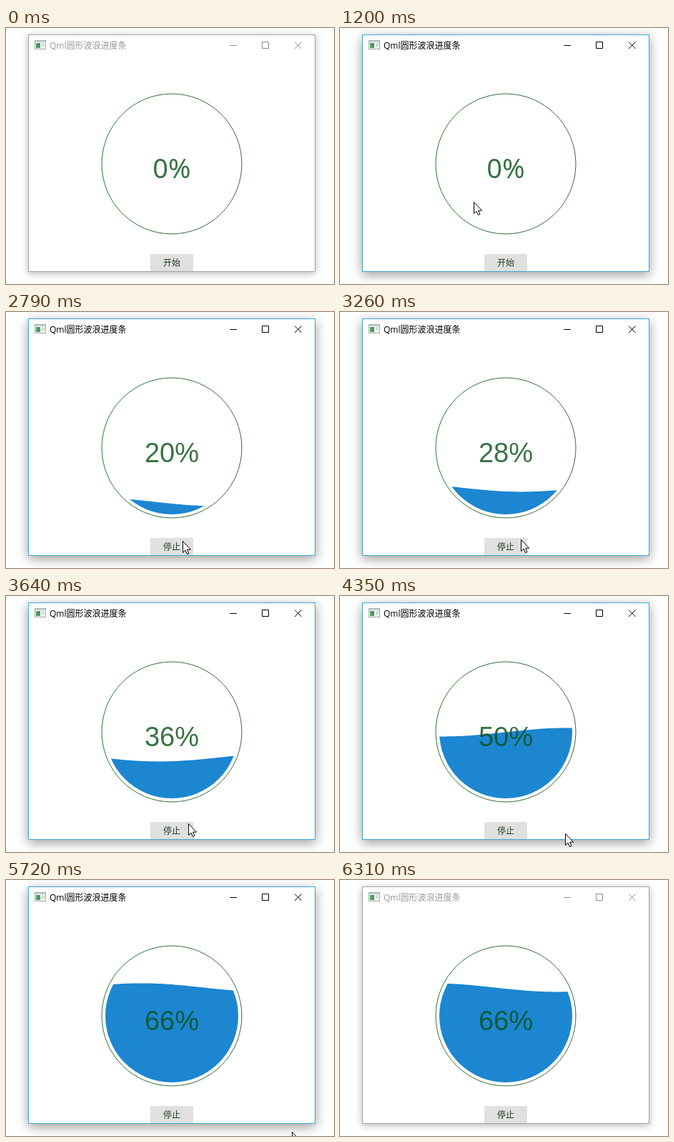
Recreate the animation shown at these times as an HTML page. Size 459 by 358 pixels, loop 6.36 s.

```html
<!DOCTYPE html>
<html lang="zh">
<head>
<meta charset="utf-8">
<title>Wave progress</title>
<style>
  html, body { margin: 0; width: 100%; height: 100%; overflow: hidden; background: #fff; }
  #stage { position: relative; width: 459px; height: 358px; overflow: hidden; }
  #win {
    position: absolute; left: 31px; top: 9px; width: 400px; height: 330px;
    border: 1px solid #a3a8a3; background: #fff;
    box-shadow: 0 2px 10px rgba(0, 0, 0, .3);
  }
  svg { position: absolute; left: 0; top: 0; }
  text { font-family: "Open Sans", "Noto Sans CJK SC", "Noto Sans CJK", sans-serif; font-size: 12px; }
  #title { fill: #999; }
  #controls { stroke: #8c8c8c; fill: none; }
  .active #win { border-color: #42a5de; box-shadow: 0 4px 15px rgba(0, 0, 0, .4); }
  .active #title { fill: #000; }
  .active #controls { stroke: #000; }
  #label { fill: #1d3a22; text-anchor: middle; }
  #percent {
    font-family: "Liberation Sans", Arial, sans-serif; font-size: 38px;
    fill: rgba(6, 80, 20, .8); text-anchor: middle;
  }
  #percent.single { font-family: "Noto Sans", "Open Sans", sans-serif; }
</style>
</head>
<body>
<div id="stage">
  <div id="win"></div>
  <svg width="459" height="358" viewBox="0 0 459 358">
    <defs>
      <clipPath id="bowl"><circle cx="232" cy="190" r="93"/></clipPath>
      <linearGradient id="rim">
        <stop offset="0" stop-color="#1f7a26"/>
        <stop offset="1" stop-color="#3c6347"/>
      </linearGradient>
    </defs>

    <g shape-rendering="crispEdges">
      <rect x="40.5" y="17.5" width="15" height="12" fill="#f4f4f4" stroke="#a4aaa8"/>
      <rect x="41" y="18" width="14" height="2" fill="#c9d0d2"/>
      <rect x="42" y="21" width="6" height="7" fill="#4f9a68"/>
      <rect x="50" y="21" width="4" height="5" fill="#d5dadc"/>
    </g>
    <text id="title" x="61" y="29">Qml圆形波浪进度条</text>
    <g id="controls">
      <path d="M313 24.5H323M358.5 19.5H367.5V28.5H358.5Z"/>
      <path d="M404 19.5L413.5 29M413.5 19.5L404 29"/>
    </g>

    <circle cx="232" cy="190" r="98" fill="none" stroke="url(#rim)"/>
    <path id="wave" fill="#1c86d1" clip-path="url(#bowl)"/>
    <text id="percent" x="232" y="209.5">0%</text>

    <rect x="202" y="316" width="60" height="24" fill="#e0e0e0"/>
    <text id="label" x="232" y="333">开始</text>

    <path id="cursor" d="M.5 .5V16.5L4 13.2L6.4 18.6L8.9 17.5L6.6 12.2H11.5Z" fill="#fff" stroke="#000"/>
  </svg>
</div>
<script>
  const LOOP = 6360, STEP = 65.2, ANCHOR = 2790, TICK = 51.6, GOAL = 66;
  const $ = id => document.getElementById(id);
  const stage = $('stage'), wave = $('wave'), percent = $('percent');
  const label = $('label'), cursor = $('cursor');

  // time, x, y
  const trail = [
    [60, 302, 350], [300, 258, 290], [680, 157, 173], [880, 157, 173],
    [1160, 187, 243], [1420, 226, 318], [2100, 230, 319], [2720, 247, 320],
    [2800, 247, 320], [3380, 255, 318], [4060, 255, 318], [4355, 315, 332],
    [4680, 384, 350], [5070, 388, 355], [5480, 394, 356], [5700, 400, 352],
    [6060, 400, 358]
  ];

  function trailAt(t) {
    const i = trail.findIndex(p => p[0] > t);
    if (i < 1) return null;
    const [a, b] = [trail[i - 1], trail[i]];
    const k = (t - a[0]) / (b[0] - a[0]);
    return [1, 2].map(j => Math.round(a[j] + (b[j] - a[j]) * k));
  }

  function wavePath(value, ticks) {
    const level = 190.4 - 2.5 * (value - 50);
    const phase = 0.09 * (ticks - 50);
    let d = 'M132 300';
    for (let x = 132; x <= 332; x += 4) {
      const y = level - 6 * Math.sin(0.018 * (x - 232) + phase);
      d += `L${x} ${y.toFixed(2)}`;
    }
    return d + 'L332 300Z';
  }

  function draw(time) {
    const t = ANCHOR + STEP * Math.floor((time - ANCHOR + 15) / STEP);
    const ticks = Math.floor(20.1 + (t - ANCHOR) / TICK);
    const value = Math.max(0, Math.min(GOAL, ticks));
    const pos = trailAt(t);

    stage.classList.toggle('active', t > 880 && t < 6100);
    percent.textContent = value + '%';
    percent.classList.toggle('single', value < 10);
    label.textContent = ticks < 0 ? '开始' : '停止';
    wave.setAttribute('d', value > 10 ? wavePath(value, ticks) : '');
    cursor.style.display = pos ? '' : 'none';
    if (pos) cursor.setAttribute('transform', `translate(${pos})`);
  }

  const start = performance.now();
  function loop() {
    draw((performance.now() - start) % LOOP);
    requestAnimationFrame(loop);
  }
  loop();
</script>
</body>
</html>
```
